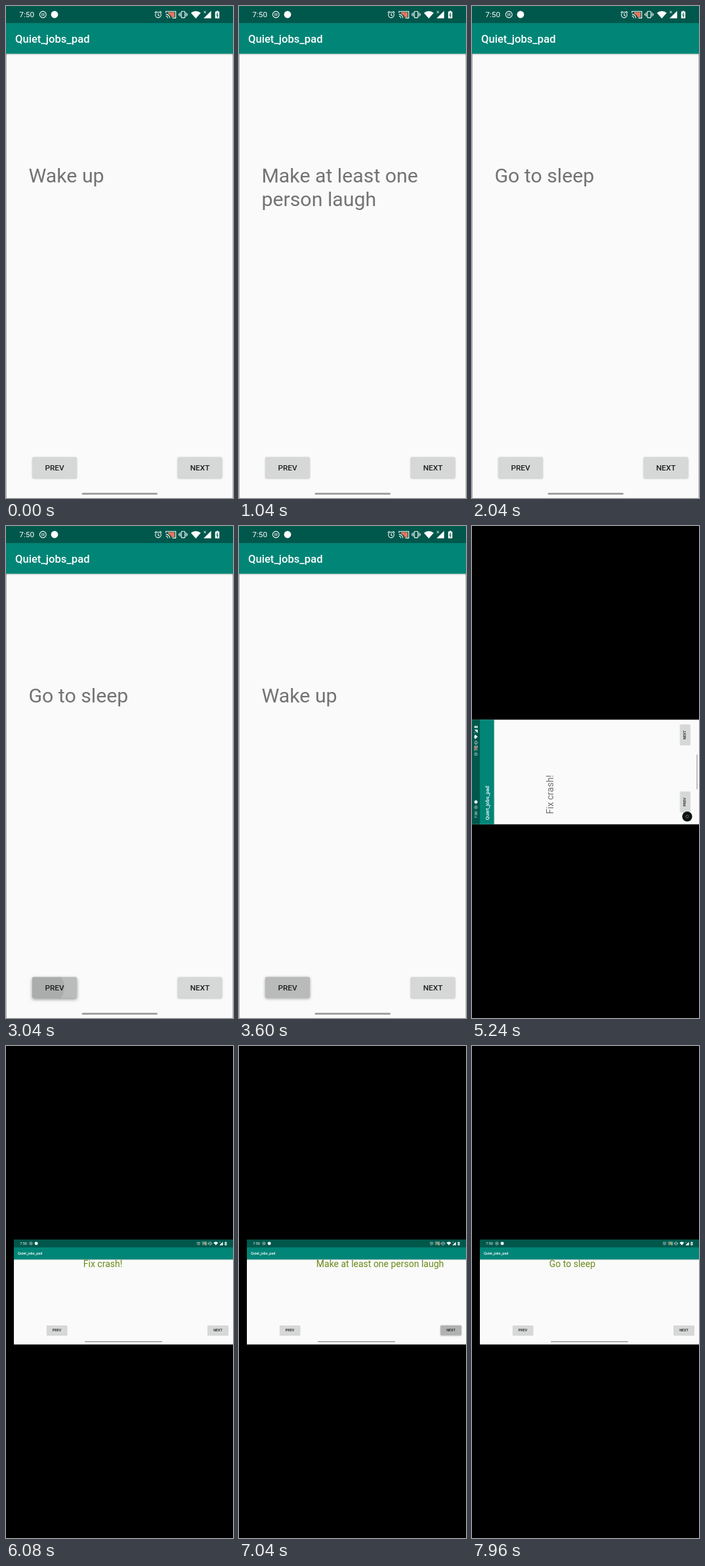
Write an HTML page that moves like this. It is 346 px wide and 750 px high and loops after 8 s.

```html
<!DOCTYPE html>
<html lang="en">
<head>
<meta charset="utf-8">
<title>Task list demo</title>
<style>
  html, body { margin: 0; width: 100%; height: 100%; overflow: hidden; background: #000; }
  svg { display: block; width: 346px; height: 750px; font-family: Roboto, "Noto Sans", sans-serif; }
  .mid { font-weight: 500; }
  .label { font-weight: 500; text-anchor: middle; fill: #1f1f1f; }
</style>
</head>
<body>
<svg viewBox="0 0 346 750">
  <defs>
    <clipPath id="band"><rect y="295" width="346" height="160"/></clipPath>
    <clipPath id="face"><rect x="-34" y="-16" width="68" height="32" rx="2"/></clipPath>
    <linearGradient id="shade" x2="0" y2="1">
      <stop stop-color="#000" stop-opacity=".2"/>
      <stop offset="1" stop-color="#000" stop-opacity="0"/>
    </linearGradient>
    <g id="clock">
      <text x="20.3" y="17.2" font-size="11.8" fill="#fff">7:50</text>
      <g fill="none" stroke="#fff" stroke-width="1.1">
        <circle cx="56.3" cy="13" r="4.9"/>
        <path d="M55 10.8v4.4M57.7 10.8v4.4"/>
      </g>
      <circle cx="74" cy="13" r="5.4" fill="#fff"/>
    </g>
    <g id="icons" fill="none" stroke="#fff" stroke-width="1.1">
      <circle cx="232" cy="13.6" r="4.3"/>
      <path d="M232 11v3l2 1.2M226.6 10.4l2.8-2.4M237.4 10.4l-2.8-2.4"/>
      <path d="M247 9.5h10v7.5h-4.5a8 8 0 0 0-5.5-5z" style="fill:var(--cast)" stroke="none"/>
      <path d="M243.8 10.5v-2.3h14.9v10.2h-5.2M243.8 12.6a6 6 0 0 1 6 6M243.8 15.5a3 3 0 0 1 3 3"/>
      <rect x="267.3" y="8.3" width="5.4" height="9.6" rx=".6"/>
      <path d="M265.4 10v6M274.6 10v6M263.6 11.4v3.2M276.4 11.4v3.2" stroke-width="1"/>
      <g fill="#fff" stroke="none">
        <path d="M281.8 10.6a11.5 11.5 0 0 1 15 0l-7.5 8.4z"/>
        <path d="M312.6 7.6v11.2h-11.4z"/>
        <path d="M320.6 8.6v-1h2.8v1h1.8v10.2h-6.4v-10.2z"/>
      </g>
      <path d="M301.6 7.6l3 3.4M304.6 7.6l-3 3.4" stroke-width=".9"/>
      <path d="M322.5 10.4l-1.3 3.6h1.8l-1.2 3.4" stroke="#00574b"/>
    </g>
  </defs>

  <rect width="346" height="750"/>
  <g id="stage">
    <g id="wide" style="--cast:#b5a76c">
      <rect x="12" y="295" width="334" height="160" fill="#fafafa"/>
      <rect x="12" y="325.3" width="334" height="1.6" fill="url(#shade)"/>
      <rect x="12" y="307" width="334" height="18.4" fill="#008577"/>
      <rect x="12" y="295" width="334" height="12" fill="#00574b"/>
      <use href="#clock" transform="translate(12 295) scale(.4613)"/>
      <use href="#icons" transform="translate(186.4 295) scale(.4613)"/>
      <text class="mid" x="18" y="318.2" font-size="5.45" fill="#fff">Quiet_jobs_pad</text>
      <text class="task" x="117.8" y="337.2" font-size="14" fill="#6b8a1a"></text>
      <rect x="120" y="450" width="118" height="1.3" rx=".6" fill="#8a8a8a"/>
    </g>
    <g id="tall" style="--cast:#e8735c">
      <rect width="346" height="750" fill="#fafafa"/>
      <path d="M.4 73v677" stroke="#949494" stroke-width=".8"/>
      <path d="M345.6 73v677" stroke="#a8a8a8" stroke-width=".8"/>
      <rect y="72.6" width="346" height="3" fill="url(#shade)"/>
      <rect y="26" width="346" height="46.8" fill="#008577"/>
      <rect width="346" height="26" fill="#00574b"/>
      <use href="#clock"/>
      <use href="#icons"/>
      <text class="mid" x="14" y="56" font-size="16.6" fill="#fff">Quiet_jobs_pad</text>
      <text class="task" x="34.4" y="269.3" font-size="30.3" fill="#737373"></text>
      <text class="more" x="34.4" y="304.8" font-size="30.3" fill="#737373"></text>
      <rect x="115.5" y="742" width="115.5" height="3" rx="1.5" fill="#a2a2a2"/>
    </g>
  </g>
</svg>
<script>
  const LOOP = 8000, TURN = 5200, SPIN = [5440, 5840], SCALE = 346 / 750;
  const HOLD = 170, FADE = 300;
  const TASKS = [["Fix crash!"], ["Wake up"], ["Make at least one", "person laugh"], ["Go to sleep"]];
  // Release time of each tap and the step it takes through the tasks
  const TAPS = [[640, 1], [1720, 1], [3120, -1], [3500, -1], [3880, -1], [6600, 1], [7000, 1], [7400, 1]];

  const $ = id => document.getElementById(id);
  const stage = $("stage"), tall = $("tall"), wide = $("wide");
  const clamp = v => Math.max(0, Math.min(1, v));
  const ramp = (t, a, b) => clamp((t - a) / (b - a));

  function add(parent, tag, attrs, text = "") {
    const el = document.createElementNS("http://www.w3.org/2000/svg", tag);
    for (const k in attrs) el.setAttribute(k, attrs[k]);
    el.textContent = text;
    return parent.appendChild(el);
  }

  function button(parent, label, x, y, scale, step) {
    const g = add(parent, "g", { transform: `translate(${x} ${y}) scale(${scale})` });
    const base = { x: -34, y: -16, width: 68, height: 32, rx: 2 };
    const body = add(g, "rect", { ...base, fill: "#d6d7d7" });
    const tint = add(g, "rect", { ...base, fill: "#000" });
    const clip = add(g, "g", { "clip-path": "url(#face)" });
    const ripple = add(clip, "circle", { cx: -14, cy: 0, fill: "#000" });
    add(g, "text", { class: "label", y: 4, "font-size": 11.8 }, label);
    return { body, tint, ripple, step };
  }

  const buttons = [
    button(tall, "PREV", 74, 703.5, 1, -1),
    button(tall, "NEXT", 295.5, 703.5, 1, 1),
    button(wide, "PREV", 77.6, 433.4, SCALE, -1),
    button(wide, "NEXT", 323, 433.4, SCALE, 1)
  ];

  const hint = add(tall, "g", { transform: "translate(26 711)" });
  add(hint, "circle", { r: 16.5, fill: "#0b1210" });
  add(hint, "rect", { x: -4, y: -4, width: 8, height: 8, rx: 1.5, transform: "rotate(45)",
    fill: "none", stroke: "#dfe6e4", "stroke-width": 1.5, "stroke-dasharray": "5 2.4" });

  function drawButton(b, t) {
    const tap = TAPS.find(([at, step]) => step === b.step && t >= at - HOLD && t < at + FADE);
    let press = 0, radius = 0;
    if (tap) {
      const start = tap[0] - HOLD;
      press = ramp(t, start, start + 80) * (1 - ramp(t, tap[0], tap[0] + FADE));
      radius = 70 * (t - start) / 220;
    }
    b.tint.setAttribute("opacity", .13 * press);
    b.ripple.setAttribute("opacity", .08 * press);
    b.ripple.setAttribute("r", radius);
    b.body.style.filter = `drop-shadow(0 ${1 + press}px ${1 + 1.5 * press}px rgba(0,0,0,${.22 + .2 * press}))`;
  }

  function draw(t) {
    const index = TAPS.reduce((i, [at, step]) => t >= at ? i + step : i, 1);
    const lines = TASKS[index];
    tall.querySelector(".task").textContent = lines[0];
    tall.querySelector(".more").textContent = lines[1] || "";
    wide.querySelector(".task").textContent = lines.join(" ");
    buttons.forEach(b => drawButton(b, t));
    hint.setAttribute("opacity", ramp(t, 4900, 5020));

    const p = ramp(t, ...SPIN), ease = p * p * (3 - 2 * p);
    const turned = t >= TURN, angle = 90 * (ease - 1);
    if (turned) stage.setAttribute("clip-path", "url(#band)");
    else stage.removeAttribute("clip-path");
    tall.setAttribute("transform", turned
      ? `translate(173 375) rotate(${angle}) scale(${SCALE}) translate(-173 -375)` : "");
    tall.setAttribute("opacity", 1 - clamp(p * 1.6));
    wide.setAttribute("transform", `rotate(${angle} 173 375)`);
    wide.setAttribute("opacity", turned ? clamp(p * 2) : 0);
  }

  const origin = performance.now();
  function tick() {
    draw((performance.now() - origin) % LOOP);
    requestAnimationFrame(tick);
  }
  draw(0);
  requestAnimationFrame(tick);
</script>
</body>
</html>
```
